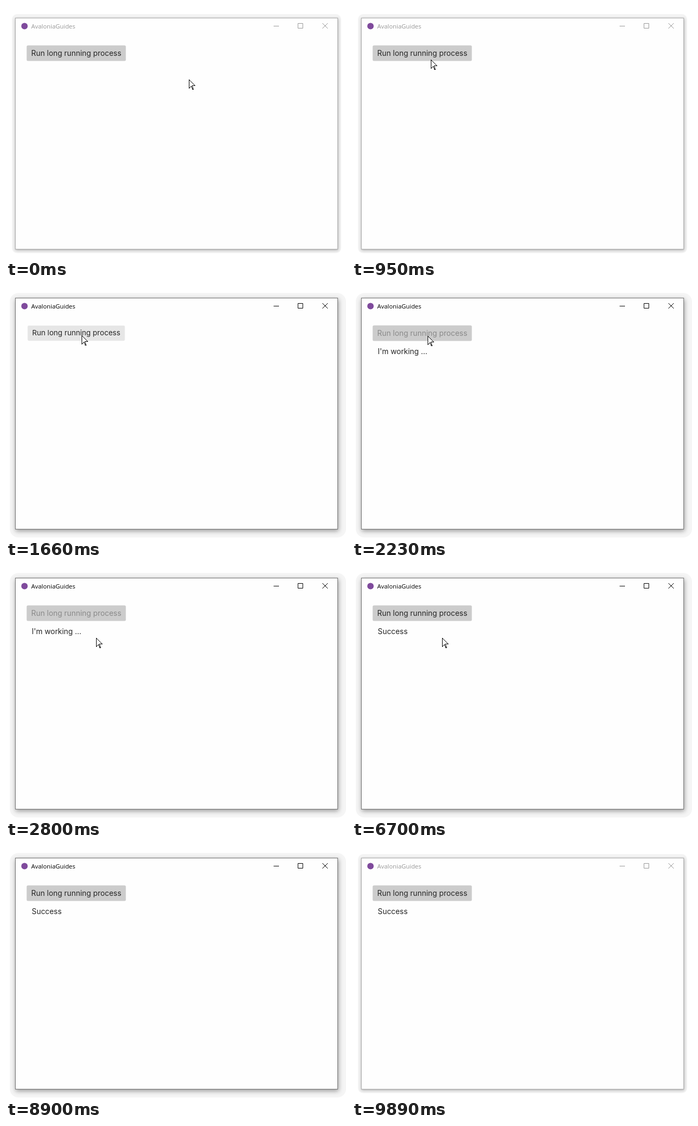
Recreate the animation shown at these times as an HTML page. Size 634 by 470 pixels, loop 9.95 s.

```html
<!DOCTYPE html>
<html lang="en">
<head>
<meta charset="utf-8">
<title>Long running process</title>
<style>
  html, body { margin: 0; width: 100%; height: 100%; overflow: hidden; background: #fff; }
  svg { display: block; width: 634px; height: 470px; }
  .ui { font: 13.9px Inter, sans-serif; fill: #262626; }
  .title { font: 11.4px "Open Sans", sans-serif; }
  .deep { filter: blur(4px); }
  .faint { filter: blur(2.5px); }
</style>
</head>
<body>
<svg viewBox="0 0 634 470" xmlns="http://www.w3.org/2000/svg">
  <g id="shadowOn">
    <rect x="7" y="13" width="627" height="456" rx="16" fill="#f5f5f5"/>
    <rect class="deep" x="18" y="25" width="602" height="432" fill-opacity=".38"/>
  </g>
  <g id="shadowOff">
    <rect x="11" y="15" width="614" height="446" rx="10" fill="#f4f4f4"/>
    <rect class="faint" x="17.5" y="23.5" width="602" height="432" fill-opacity=".3"/>
  </g>
  <rect id="frame" x="17.5" y="22.5" width="601" height="431" fill="#fefefe"/>
  <circle cx="34.5" cy="37.5" r="6" fill="#7f4a9c"/>
  <text id="title" class="title" x="47" y="42">AvaloniaGuides</text>
  <g id="controls" fill="none">
    <path d="M499 37.5h10M544.5 32.5h9v9h-9z"/>
    <path d="M590 32l10 10M600 32l-10 10"/>
  </g>
  <g id="button">
    <rect id="face" x="38.5" y="73.5" width="185" height="29" rx="2.5"/>
    <text id="label" class="ui" x="47" y="93">Run long running process</text>
  </g>
  <text id="status" class="ui" x="48" y="127"></text>
  <path id="cursor" d="M.5 .5V16.5L4.5 12.5 7 18.5H8.5L6.5 12.5V11.5H11.5Z"
    fill="#fff" stroke="#000" shape-rendering="crispEdges"/>
</svg>
<script>
const LOOP = 9950, STEP = 60;
const $ = id => document.getElementById(id);
const set = (id, attrs) => {
  for (const k in attrs) $(id).setAttribute(k, attrs[k]);
};

const easeOut = p => 1 - (1 - p) ** 2.7;
const smooth = p => p * p * (3 - 2 * p);

// Cursor strokes: cubic curves whose first step shows at `start`.
const home = [341, 137], press = [141, 92], rest = [168, 134];
const moves = [
  { start: 310, end: 1300, ease: easeOut, curve: [home, [402, 208], [172, 142], press] },
  { start: 2230, end: 2800, ease: smooth, curve: [press, [146, 108], [158, 122], rest] },
  { start: 8200, end: 8900, ease: smooth, curve: [rest, [260, 225], [470, 380], [620, 492]] }
];

function bezier([a, b, c, d], u) {
  const v = 1 - u;
  return [0, 1].map(i => Math.round(
    v ** 3 * a[i] + 3 * v * v * u * b[i] + 3 * v * u * u * c[i] + u ** 3 * d[i]));
}

function cursorAt(t) {
  const { start, end, ease, curve } = moves.filter(m => t >= m.start).pop() || moves[0];
  if (t < start) return home;
  const n = Math.round((end - start) / STEP) + 1;
  const i = Math.floor((t - start) / (end - start) * (n - 1)) + 1;
  return bezier(curve, ease(Math.min(1, i / n)));
}

function draw(t) {
  const active = t >= 1540 && t < 9890;
  const busy = t >= 1720 && t < 6700;
  const hover = t >= 1010 && t < 1720;
  const held = t >= 1600 && t < 1720;
  const pressed = held && t < 1660;
  const ink = active ? "#000" : "#999";

  set("shadowOn", { visibility: active ? "visible" : "hidden" });
  set("shadowOff", { visibility: active ? "hidden" : "visible" });
  set("frame", { stroke: active ? "#707070" : "#aaa" });
  set("title", { fill: ink });
  set("controls", { stroke: ink });

  set("face", { fill: pressed ? "#999" : hover ? "#e6e6e6" : "#ccc" });
  set("button", { transform: held ? "translate(131 88) scale(.98) translate(-131 -88)" : "" });
  set("label", { y: held ? 92 : 93 });
  $("label").style.fill = busy ? "#8a8a8a" : "";
  $("status").textContent = busy ? "I'm working ..." : t >= 6700 ? "Success" : "";

  set("cursor", { transform: `translate(${cursorAt(t)})` });
}

const begin = performance.now();
function tick() {
  draw((performance.now() - begin) % LOOP);
  requestAnimationFrame(tick);
}
tick();
</script>
</body>
</html>
```
